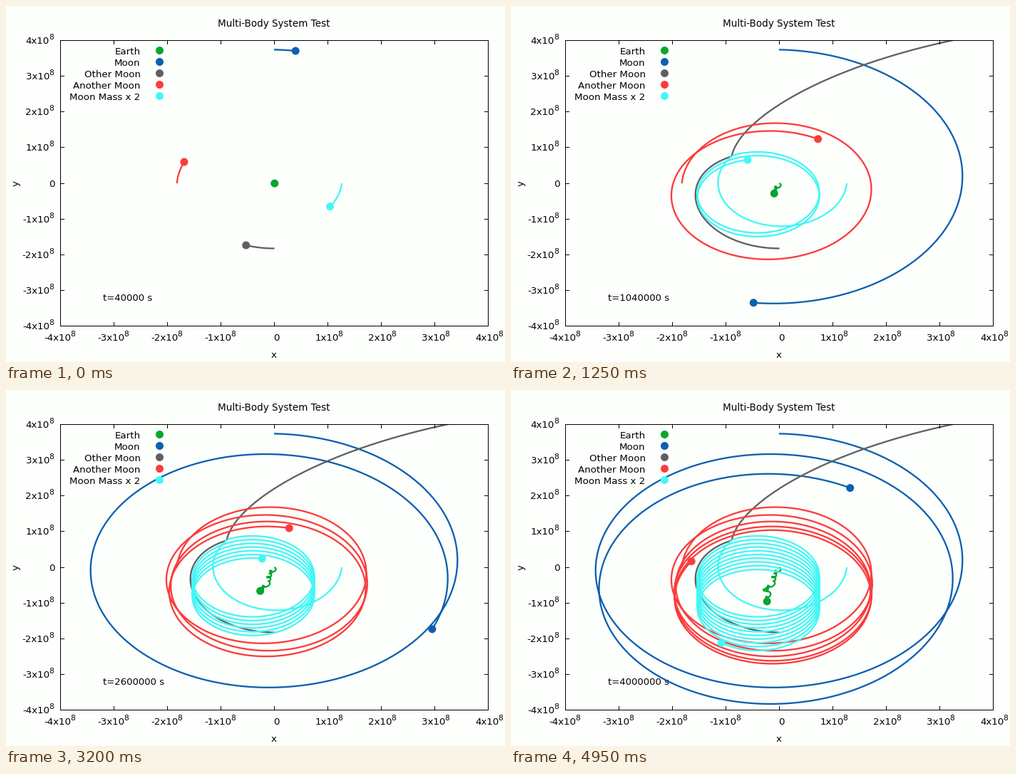
Write a matplotlib script that moves like this. It is 700 by 500 pixels and loops after 5000 ms.

```python
import numpy as np
import matplotlib.pyplot as plt
from matplotlib.animation import FuncAnimation
from matplotlib.patches import Circle, Rectangle

W, H, DPI = 700, 500, 100
PX = 72 / DPI                      # one pixel in points
FRAMES, SUB = 100, 20              # one frame is 40000 s, SUB samples each
SX, SY = 75, 50.125                # pixels per 1e8 m
LEFT, RIGHT, TOP, BOTTOM = 76.5, 676.5, 48.5, 449.5
BG = "#fdfffc"
BODIES = [("Earth", "#04a62f"), ("Moon", "#0c60b0"), ("Other Moon", "#606064"),
          ("Another Moon", "#fb3c3e"), ("Moon Mass x 2", "#46f6f6")]
MEET = 6.1                         # time of the close encounter
MASS = 0.0123                      # moon mass / earth mass
KEY_TIMES = np.array([0, 10, 26, 40, 55, 75, 100])


# ---------- motion ----------
def turn(t, angles):
    """Smooth orbital angle through its values at KEY_TIMES."""
    v = np.array(angles, float)
    slope = np.gradient(v, KEY_TIMES)
    i = np.clip(np.searchsorted(KEY_TIMES, t, "right") - 1, 0, len(v) - 2)
    h = KEY_TIMES[i + 1] - KEY_TIMES[i]
    u = (t - KEY_TIMES[i]) / h
    return ((1 + 2 * u) * (1 - u) ** 2 * v[i] + u * (1 - u) ** 2 * h * slope[i]
            + u * u * (3 - 2 * u) * v[i + 1] + u * u * (u - 1) * h * slope[i + 1])


def kepler(mean, e):
    """Eccentric anomaly for a mean anomaly, both in degrees."""
    m = np.radians(mean)
    ecc = m.copy()
    for _ in range(90):
        ecc = m + e * np.sin(ecc)
    return np.degrees(ecc)


def ellipse(cx, cy, a, b, angle):
    """Clockwise orbit; angle 0 is the right end, 90 the bottom."""
    rad = np.radians(angle)
    return np.column_stack([cx + a * np.cos(rad), cy + b * np.sin(rad)])


def moon_path(t):
    angle = turn(t, [-90, -23, 97.5, 206.5, 309.5, 460.5, 656.7])
    return ellipse(376 - 0.09 * t, 233.6 + 0.53 * t,
                   261 - 0.19 * t, 172.3 - 0.055 * t, angle)


def another_path(t):
    angle = turn(t, [183.5, 378, 657.5, 905.6, 1181, 1544.5, 2014])
    wobble = 10 * np.cos(np.pi * t / 18) * np.exp(-t / 25)
    return ellipse(367.5 + wobble, 254.75 + 0.618 * t - 0.0024 * t ** 2,
                   138, 92.9, angle)


def heavy_path(t):
    first = ellipse(389 - 3.3 * t, 249 + 0.5 * t, 82, 59, kepler(36 * t, -0.1))
    mean = turn(t, [22, 402, 990, 1518, 2072, 2823, 3719])
    later = ellipse(347, 257 + 0.538 * t, 85.5, 55.7, kepler(mean, 0.18))
    return np.where((t <= MEET)[:, None], first, later)


def other_path(t, meet):
    """Falls towards the heavy moon, then is flung onto a long ellipse."""
    early, late = np.minimum(t, MEET), np.maximum(t, MEET)
    first = ellipse(376.5, 263, 118.5, 77.5, 90 + 19.5 * early + 0.1 * early ** 3)
    first += (meet - first[-1]) * ((early / MEET) ** 6)[:, None]

    e, a, b = 0.843, 6.315, 3.40
    ecc = np.radians(kepler(13.85 + 2.883 * (late - 10), e))
    along, across = a * (np.cos(ecc) - e), b * np.sin(ecc)
    later = np.column_stack([371 - SX * (0.980 * along + 0.198 * across),
                             252 + SY * (0.198 * along - 0.980 * across)])
    later += (meet - later[0]) * np.exp(-1.5 * (late - MEET))[:, None]
    return np.where((t <= MEET)[:, None], first, later)


def earth_path(t, moons):
    """Earth follows from conservation of momentum."""
    total = sum(m * path for m, path in moons)
    drift = t[:, None] * np.array([-9.5, 41.3])
    return np.array([376.5, 249]) + MASS * (drift + total[0] - total)


t = np.arange(FRAMES * SUB + 1) / SUB
moon, another, heavy = moon_path(t), another_path(t), heavy_path(t)
other = other_path(t, heavy[round(MEET * SUB)])
earth = earth_path(t, [(1, moon), (1, other), (1, another), (2, heavy)])
paths = [earth, moon, other, another, heavy]

# ---------- stage ----------
plt.rcParams["font.family"] = "DejaVu Sans"
fig = plt.figure(figsize=(W / DPI, H / DPI), dpi=DPI, facecolor=BG)
ax = fig.add_axes([0, 0, 1, 1])
ax.set_xlim(0, W)
ax.set_ylim(H, 0)
ax.axis("off")


def label(x, y, text, ha="left", size=13.33, **kw):
    kw.setdefault("va", "baseline")
    return ax.text(x, y, text, ha=ha, fontsize=size * PX, color="black",
                   zorder=2, **kw)


def rule(x0, y0, x1, y1):
    ax.plot([x0, x1], [y0, y1], color="black", lw=PX, zorder=6, snap=False,
            solid_capstyle="butt")


def power(x, y, k):
    """Number k x 10^8 with the exponent starting near x."""
    label(x, y, f"{k}x10", "right")
    label(x - 0.8, y - 6, "8", size=10.6)


def disc(x, y, color, zorder):
    return ax.add_patch(Circle((x, y), 5.5, fc=color, lw=0, zorder=zorder))


ax.add_patch(Rectangle((LEFT, TOP), RIGHT - LEFT, BOTTOM - TOP, fill=False,
                       ec="black", lw=PX, zorder=6, snap=False))
for k in range(-4, 5):
    x = 376.5 + SX * k
    y = np.floor(249 - SY * k) + 0.5
    rule(x, TOP, x, TOP + 5.5)
    rule(x, BOTTOM, x, BOTTOM - 5.5)
    rule(LEFT, y, LEFT + 5.5, y)
    rule(RIGHT, y, RIGHT - 5.5, y)
    if k:
        power(x + 15, 470.5, k)
        power(61, y + 4.5, k)
    else:
        label(383.3, 470.5, "0", "right")
        label(68.5, y + 4.5, "0", "right")

label(376, 29, "Multi-Body System Test", "center", 13.5)
label(376, 494, "x", "center")
label(14, 249, "y", "center", va="center", rotation=90)
clock = label(135.7, 414, "", size=13.2)

box = Rectangle((LEFT, TOP), RIGHT - LEFT, BOTTOM - TOP, transform=ax.transData)
trails, dots = [], []
for i, (name, color) in enumerate(BODIES):
    label(188.5, 68 + 16 * i, name, "right")
    disc(215.5, 62.5 + 16 * i, color, 5)
    trail, = ax.plot([], [], color=color, lw=2.3 * PX, zorder=3,
                     solid_capstyle="butt")
    trail.set_clip_path(box)
    trails.append(trail)
    dots.append(disc(0, 0, color, 4))


def draw(n):
    end = (n + 1) * SUB
    for trail, dot, path in zip(trails, dots, paths):
        trail.set_data(path[:end + 1, 0], path[:end + 1, 1])
        x, y = path[end]
        dot.center = x, y
        dot.set_visible(bool(LEFT <= x <= RIGHT and TOP <= y <= BOTTOM))
    clock.set_text(f"t={40000 * (n + 1)} s")
    return trails + dots + [clock]


anim = FuncAnimation(fig, draw, frames=FRAMES, interval=50, repeat=True,
                     repeat_delay=0, blit=False)
plt.show()
```
